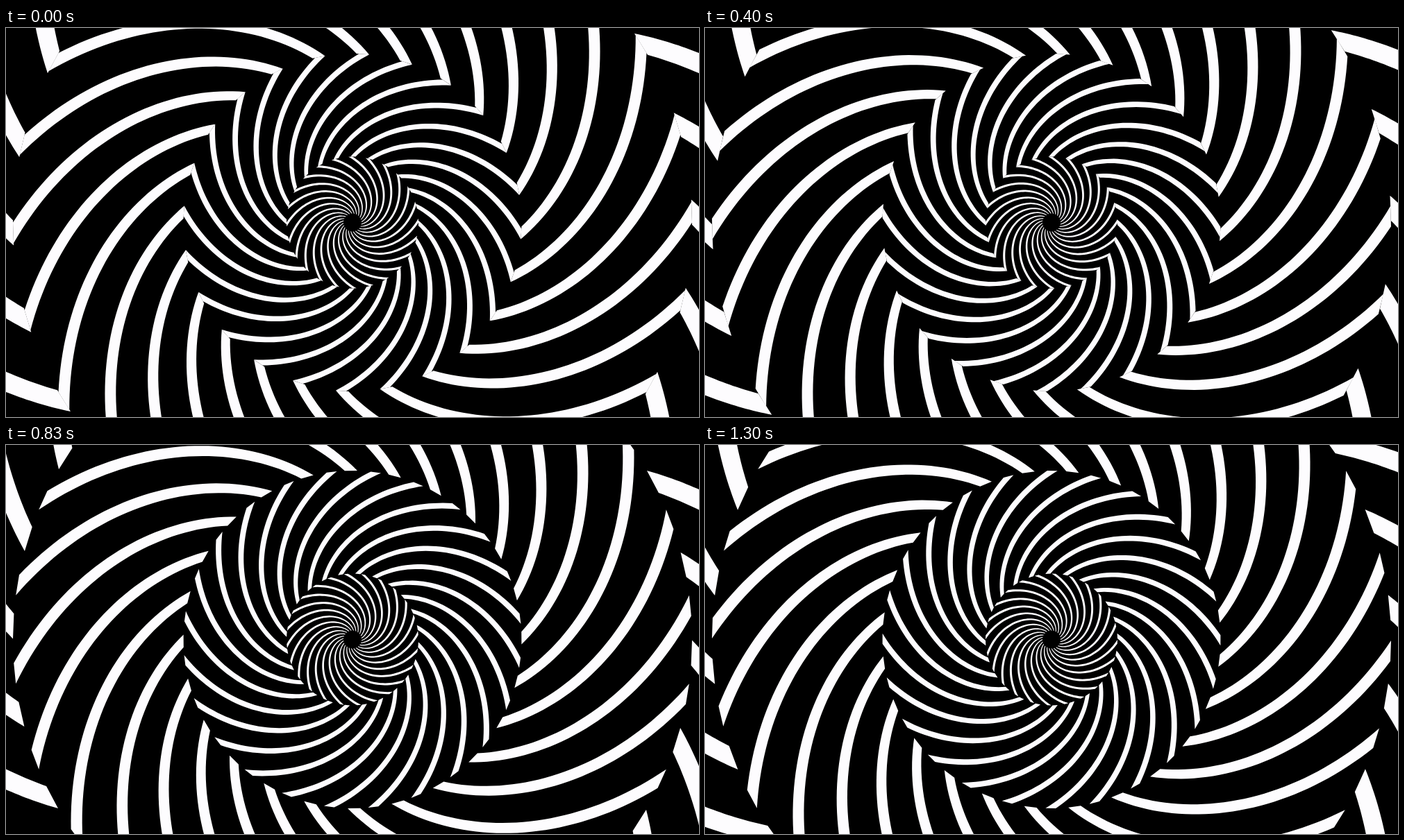
An HTML page with a canvas for the animation above (1330 ms loop, 998 by 561 pixels).

```html
<!DOCTYPE html>
<html lang="en">
<head>
<meta charset="utf-8">
<title>Counter-rotating spirals</title>
<style>
  html, body { margin: 0; width: 100%; height: 100%; overflow: hidden; background: #000; }
  canvas { display: block; width: 998px; height: 561px; }
</style>
</head>
<body>
<canvas id="stage" width="998" height="561"></canvas>
<script>
const ctx = document.getElementById('stage').getContext('2d');
const RAD = Math.PI / 180;
const ARMS = 24;
const PITCH = 360 / ARMS;
const TWIST = 147;       // degrees an arm turns from the centre to the rim
const BEND = 0.6;        // below 1 the arms turn faster near the centre
const LOOP = 1330;
const STEP = 8 / 3;      // degrees per step

// The same spiral disc at several sizes, stacked, every second one mirrored.
// rim: angle of an arm at the full radius; from, to: the visible band.
const discs = [
  { radius: 95, from: 13, to: 95, rim: 13.25, dir: -1 },
  { radius: 243.5, from: 95, to: 243.5, rim: 3.95, dir: 1 },
  { radius: 489, from: 243.5, to: 489, rim: 13.25, dir: -1 },
  { radius: 980, from: 489, to: 640, rim: 3.95, dir: 1 }
];

// Angular width of an arm at u, the radius as a part of the disc's radius
const armWidth = u => 3.5 + 1.5 * (1 - u);

function makeArms({ radius, from, to, rim, dir }) {
  const path = new Path2D();
  const n = 40;
  for (let arm = 0; arm < ARMS; arm++) {
    const points = [];
    const addPoint = (i, side) => {
      const r = from + (to - from) * i / n;
      const u = r / radius;
      const turn = TWIST * (1 - u ** BEND);
      const a = (rim + arm * PITCH - dir * turn + side * armWidth(u) / 2) * RAD;
      points.push([r * Math.cos(a), r * Math.sin(a)]);
    };
    for (let i = 0; i <= n; i++) addPoint(i, -1);
    for (let i = n; i >= 0; i--) addPoint(i, 1);
    path.moveTo(...points[0]);
    for (const p of points) path.lineTo(...p);
    path.closePath();
  }
  return { path, dir };
}

// The outermost band starts where the mirrored arms of its neighbour end
const outer = discs[3];
outer.rim = discs[2].rim + TWIST * (1 - (outer.from / outer.radius) ** BEND);
const rings = discs.map(makeArms);

function draw(now) {
  // 30 steps a second on a 10 ms clock; the first pose is held for two steps
  const tick = Math.floor((now % LOOP) / 10);
  const step = Math.floor((tick * 3 + 1) / 10);
  const turn = Math.max(0, step - 1) * STEP;

  ctx.setTransform(1, 0, 0, 1, 0, 0);
  ctx.fillStyle = '#000';
  ctx.fillRect(0, 0, 998, 561);
  ctx.fillStyle = '#fdfcfe';
  for (const { path, dir } of rings) {
    ctx.setTransform(1, 0, 0, 1, 499, 280.5);
    ctx.rotate(dir * turn * RAD);
    ctx.fill(path);
  }
}

const begin = performance.now();
function loop() {
  draw(performance.now() - begin);
  requestAnimationFrame(loop);
}
loop();
</script>
</body>
</html>
```
